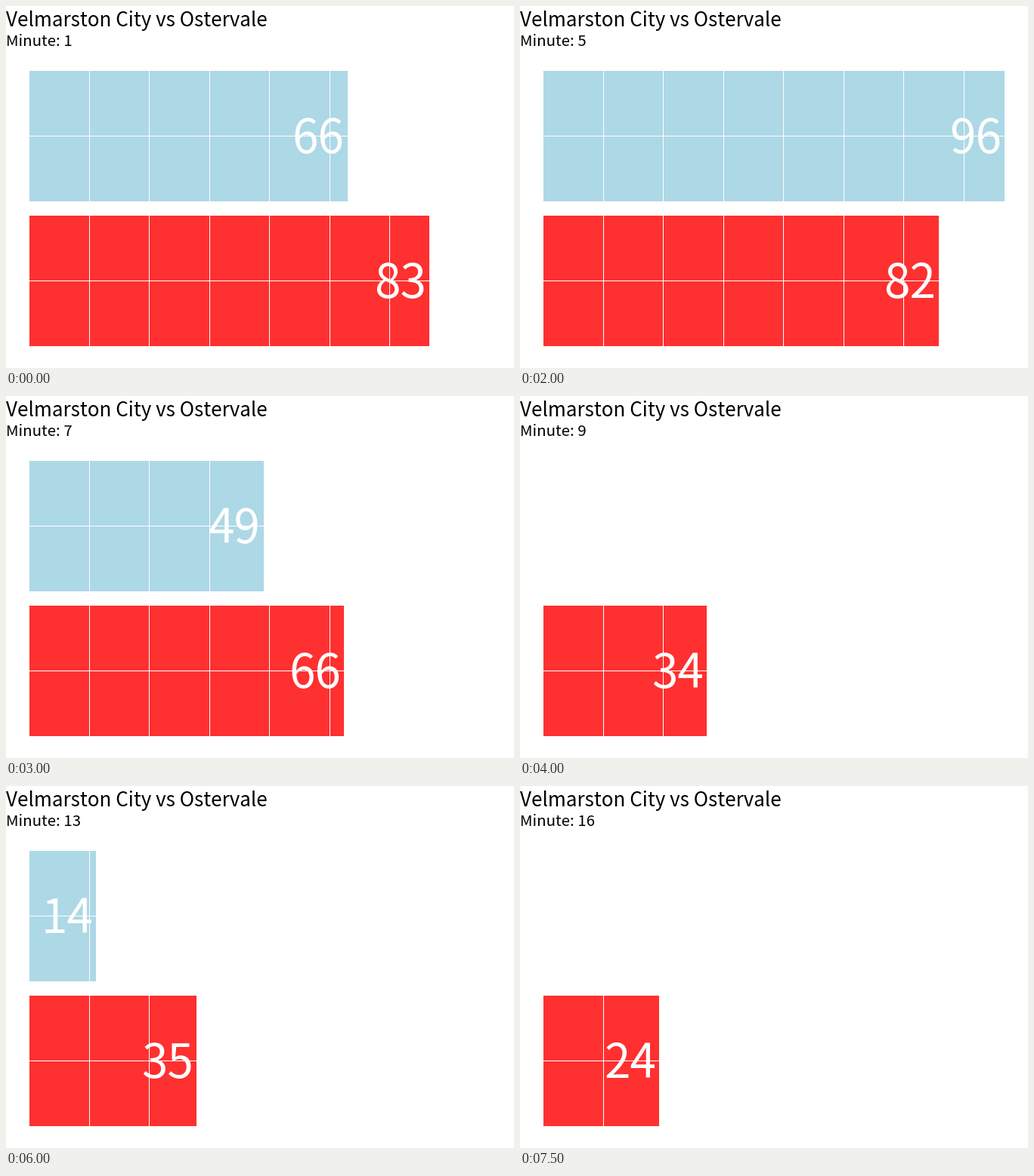
These frames come from a looping animation (672 by 480 pixels, 8 s). A matplotlib script:

```python
import matplotlib.pyplot as plt
from matplotlib.animation import FuncAnimation
from matplotlib.patches import Rectangle

W, H, DPI = 672, 480, 96
PX = 72 / DPI                       # one pixel in points
LEFT, UNIT, BAR_H = 31, 6.35, 173   # bar origin, pixels per point, bar height
FONT = "Noto Sans CJK JP"

# Bar lengths in pixels, one per minute; 0 means no bar
HOME = [421, 86, 259, 444, 610, 100, 310, 501, 0, 159, 346, 360, 88, 0, 589, 0]
AWAY = [529, 269, 376, 299, 523, 269, 416, 319, 216, 0, 534, 269, 221, 456, 299, 153]

fig = plt.figure(figsize=(W / DPI, H / DPI), dpi=DPI, facecolor="white")
ax = fig.add_axes([0, 0, 1, 1])
ax.set_xlim(0, W)
ax.set_ylim(H, 0)
ax.axis("off")


def put_text(x, y, s, px, color="black"):
    return ax.text(x, y, s, family=FONT, size=px * PX, color=color,
                   ha="left", va="baseline", zorder=3)


class Bar:
    def __init__(self, top, color, lengths):
        self.lengths = lengths
        self.rect = ax.add_patch(
            Rectangle((LEFT, top), 0, BAR_H, facecolor=color, linewidth=0, zorder=1))
        self.label = put_text(0, top + 109, "", 62, "white")
        ax.axhline(top + BAR_H // 2, color="white", lw=PX, zorder=2)

    def show(self, i):
        length = self.lengths[i]
        self.rect.set_width(length)
        self.rect.set_visible(length > 0)
        self.label.set_x(LEFT + length - 73)
        self.label.set_text(str(round(length / UNIT)) if length else "")


put_text(0, 27, "Velmarston City vs Ostervale", 26)
minute = put_text(0, 53, "", 20.4)
bars = [Bar(86, "#ADD8E6", HOME), Bar(278, "#FF3030", AWAY)]

for k in range(1, 8):
    ax.axvline(int(LEFT + 79.45 * k), color="white", lw=PX, zorder=2)


def update(i):
    minute.set_text(f"Minute: {i + 1}")
    for bar in bars:
        bar.show(i)
    return [minute] + [a for b in bars for a in (b.rect, b.label)]


anim = FuncAnimation(fig, update, frames=len(HOME), interval=500,
                     repeat=True, blit=False)
plt.show()
```
